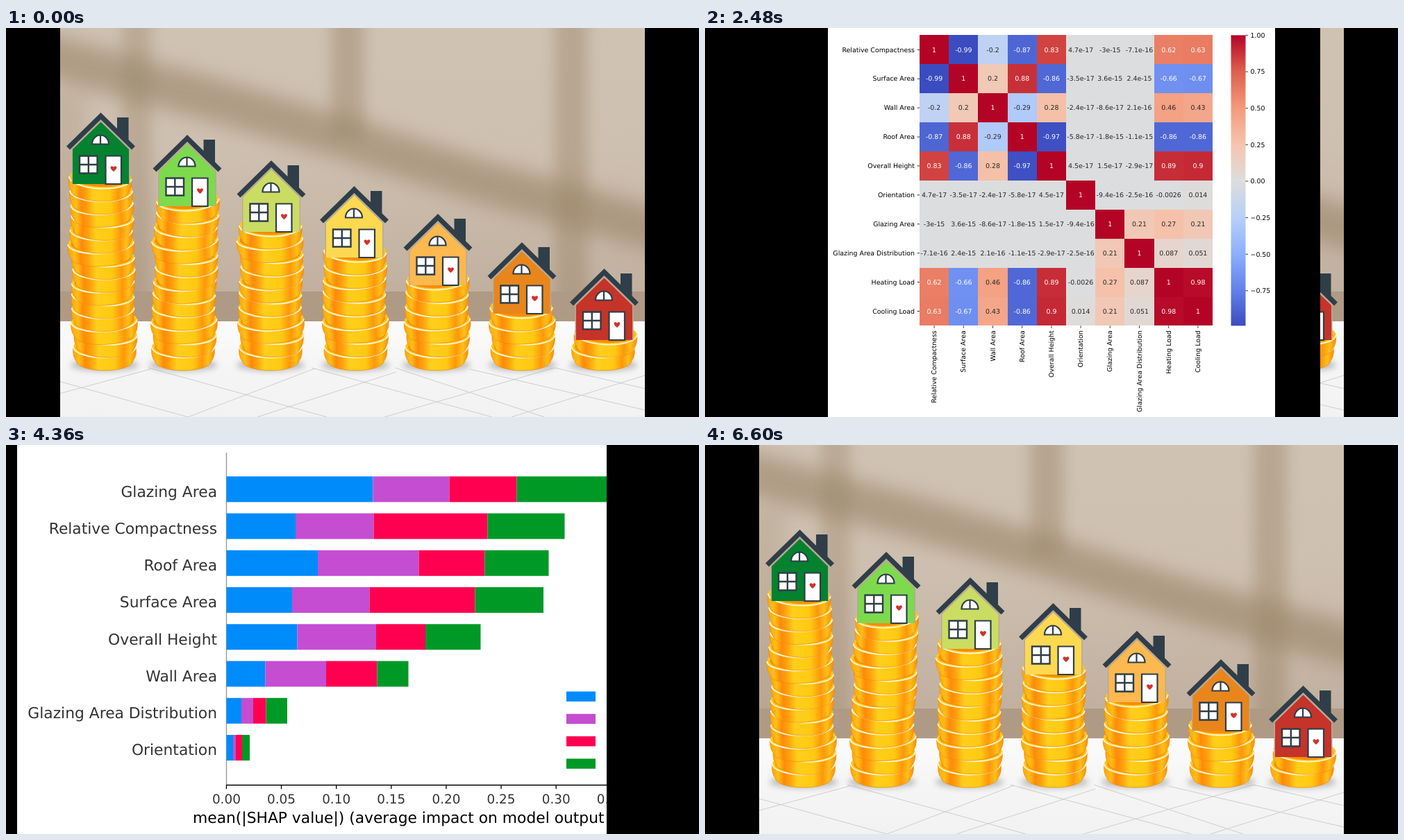
Recreate the animation shown at these times as an HTML page. Size 998 by 561 pixels, loop 7.16 s.

```html
<!DOCTYPE html>
<html lang="en">
<head>
<meta charset="utf-8">
<title>Energy efficiency slides</title>
<style>
  html, body { margin: 0; width: 100%; height: 100%; overflow: hidden; background: #000; }
  svg { display: block; }
  text { font-family: "DejaVu Sans", Verdana, sans-serif; text-rendering: geometricPrecision; }
</style>
</head>
<body>
<svg id="stage" width="998" height="561" viewBox="0 0 998 561"></svg>
<script>
const W = 998, H = 561;
const LOOP = 7160, FRAME = 40, WIPE = 2000;
const WIPE_STARTS = [920, 2840, 4760];

const rect = (x, y, w, h, fill, extra = '') =>
  `<rect x="${x}" y="${y}" width="${w}" height="${h}" fill="${fill}" ${extra}/>`;
const path = (d, fill = 'none', stroke = 'none', width = 1, extra = '') =>
  `<path d="${d}" fill="${fill}" stroke="${stroke}" stroke-width="${width}" ${extra}/>`;
const text = (x, y, size, str, anchor = 'start', fill = '#000', extra = '') =>
  `<text x="${x}" y="${y}" font-size="${size}" text-anchor="${anchor}" fill="${fill}" ${extra}>${str}</text>`;
const stops = list => list.map(([at, color]) => `<stop offset="${at}" stop-color="${color}"/>`).join('');

// Houses on coin stacks

const DARK = '#2f3e48';
const STACKS = [
  // house x, house bottom, base x, coins, wall colour
  [136.5, 225, 142, 14, '#04822f'],
  [261, 257, 255, 12, '#7dda4d'],
  [382, 294, 381, 10, '#cadd62'],
  [501.5, 331, 503.5, 8, '#fcd950'],
  [622, 371, 620, 6, '#fbb94f'],
  [743, 412, 743.5, 4, '#e8861b'],
  [861.5, 450, 860, 2, '#c53329'],
];

// The origin is the front of the upper rim
function coin(x, y, r, tilt) {
  const low = r - 4;
  return `<g transform="translate(${x} ${y}) rotate(${tilt})">`
    + path(`M${-r} -15c-1 8 0 15 4 20a${low} 14 0 0 0 ${2 * low} 0c4 -5 5 -12 4 -20z`, 'url(#gold)', '#f08a08', 0.7)
    + `<ellipse cy="-15" rx="${r}" ry="16" fill="#ffc51a"/>`
    + `<ellipse cy="-15" rx="${r - 4}" ry="13" fill="#f78c08"/>`
    + path(`M${-r} -15a${r} 15.500 0 0 0 ${2 * r} 0`, 'none', '#fff6d8', 1.8)
    + '</g>';
}

function stack([houseX, bottom, baseX, count]) {
  const pitch = (475 - bottom - 6) / (count - 1);
  let out = `<ellipse cx="${baseX}" cy="486" rx="49" ry="9" fill="#777" opacity=".45" filter="url(#soft4)"/>`;
  for (let k = 0; k < count; k++) {
    const lean = (houseX - baseX) * k / (count - 1);
    const wide = k % 6 === 2;
    const tilt = k ? 3 * Math.sin(k * 2.1) : 0;
    out += coin(baseX + lean + 1.5 * Math.sin(k * 1.3), 475 - pitch * k, wide ? 47.5 : 45, tilt);
  }
  return out;
}

function house([x, bottom, , , color]) {
  return `<g transform="translate(${x} ${bottom})">`
    + rect(23.5, -96, 16.5, 40, DARK)
    + path('M-42 0V-54L0 -95L42 -54V0z', '#b9a895')
    + path('M-40.5 0V-50L0 -89.5L40.5 -50V0z', color)
    + path('M-47 -52L0 -98L47 -52', 'none', DARK, 7)
    + path('M-12.5 -57.5a12 13 0 0 1 24 0zM-.5 -70V-57.5', '#fff', DARK, 2.2)
    + path('M-30.5 -40.5h25.5v25h-25.5zM-17.7 -40.5v25M-30.5 -28h25.5', '#fff', DARK, 2.4)
    + path('M7 0V-40.5H29.5V0z', '#fff', DARK, 2.2)
    + path('M18.5 -18C11 -23 14.5 -28 18.5 -24.5C22.5 -28 26 -23 18.5 -18z', '#d3312c')
    + '</g>';
}

function homeScene() {
  const shade = (d, width, opacity, blur) =>
    path(d, 'none', '#9c866a', width, `opacity="${opacity}" filter="url(#${blur})"`);
  return rect(0, 0, W, H, '#000')
    + '<svg x="78" width="842" height="561" viewBox="78 0 842 561">'
    + rect(78, 0, 842, 382, 'url(#wall)')
    + shade('M30 32L300 104L500 163L700 226L970 300', 62, 0.62, 'soft14')
    + shade('M188 -40V420', 42, 0.4, 'soft10')
    + shade('M40 90V420', 150, 0.24, 'soft14')
    + shade('M492 -40V160', 48, 0.48, 'soft10')
    + shade('M814 -40V420', 48, 0.46, 'soft10')
    + rect(78, 380, 842, 44, '#af9a86')
    + rect(78, 423, 842, 138, 'url(#floor)')
    + path('M78 527L208 492M78 510L262 561M205 490L462 561M262 561L445 491M362 561L562 496'
      + 'M440 490L700 561M560 490L775 561M545 561L790 490M668 492L920 551M728 561L920 501M790 490L920 520',
      'none', '#cdcdcd', 1)
    + STACKS.map(stack).join('') + STACKS.map(house).join('')
    + '</svg>';
}

// Correlation heatmap

const FEATURES = ['Relative Compactness', 'Surface Area', 'Wall Area', 'Roof Area', 'Overall Height',
  'Orientation', 'Glazing Area', 'Glazing Area Distribution', 'Heating Load', 'Cooling Load'];
// Upper triangle, one row per feature, starting at the diagonal
const CORRELATION = [
  '1 -0.99 -0.2 -0.87 0.83 4.7e-17 -3e-15 -7.1e-16 0.62 0.63',
  '1 0.2 0.88 -0.86 -3.5e-17 3.6e-15 2.4e-15 -0.66 -0.67',
  '1 -0.29 0.28 -2.4e-17 -8.6e-17 2.1e-16 0.46 0.43',
  '1 -0.97 -5.8e-17 -1.8e-15 -1.1e-15 -0.86 -0.86',
  '1 4.5e-17 1.5e-17 -2.9e-17 0.89 0.9',
  '1 -9.4e-16 -2.5e-16 -0.0026 0.014',
  '1 0.21 0.27 0.21',
  '1 0.087 0.051',
  '1 0.98',
  '1',
].map(row => row.split(' '));
const COOLWARM = [[59, 76, 192], [98, 130, 234], [141, 176, 254], [184, 208, 249], [221, 221, 221],
  [245, 196, 173], [244, 154, 123], [222, 96, 77], [180, 4, 38]];

function coolwarm(value) {
  const pos = (value + 0.99) / 1.99 * 8;
  const i = Math.min(7, Math.floor(pos));
  const mix = COOLWARM[i].map((c, n) => Math.round(c + (COOLWARM[i + 1][n] - c) * (pos - i)));
  return `rgb(${mix})`;
}

function heatScene() {
  const left = 309, top = 10.4, cw = 42.2, ch = 41.9, size = 9.41;
  let out = rect(0, 0, W, H, '#000') + rect(177, 0, 644, H, '#fff');
  let notes = '';
  FEATURES.forEach((name, r) => {
    const midY = top + (r + 0.5) * ch, midX = left + (r + 0.5) * cw;
    FEATURES.forEach((_, c) => {
      const label = CORRELATION[Math.min(r, c)][Math.abs(r - c)];
      const x = left + c * cw;
      out += rect(x, top + r * ch, cw, ch, coolwarm(+label), 'shape-rendering="crispEdges"');
      notes += text(x + cw / 2, midY + 3.2, size, label, 'middle', Math.abs(+label) > 0.55 ? '#fff' : '#262626');
    });
    notes += path(`M305.6 ${midY}H309M${midX} 429.4v3.4`, 'none', '#000', 0.8)
      + text(302, midY + 3.2, size, name, 'end')
      + text(0, 0, size, name, 'end', '#000', `transform="translate(${midX + 3} 436.3) rotate(-90)"`);
  });
  out += notes + rect(757.5, top, 21, 419, 'url(#scale)');
  for (let i = 0; i < 8; i++) {
    const y = top + i * 52.64, value = 1 - i / 4;
    out += path(`M778.5 ${y}h3.4`, 'none', '#000', 0.8)
      + text(785.5, y + 3.4, size, value.toFixed(2).replace('-', '\u2212'));
  }
  return out;
}

// Stacked importance bars

const CLASSES = [['Class 0', '#008bfb'], ['Class 3', '#c44dd2'], ['Class 2', '#ff0051'], ['Class 1', '#009926']];
const BARS = [
  ['Glazing Area', 528.5, 638.5, 735.5, 925.5],
  ['Relative Compactness', 417, 529.5, 693.5, 804.5],
  ['Roof Area', 449, 594.5, 689.5, 781.5],
  ['Surface Area', 412, 523.5, 675.5, 774],
  ['Overall Height', 419.5, 533, 604, 683.5],
  ['Wall Area', 373.5, 461, 534.5, 579.5],
  ['Glazing Area Distribution', 339, 356, 374.5, 405],
  ['Orientation', 327, 331, 340, 351],
];

function barScene() {
  let out = rect(0, 0, W, H, '#000') + rect(16, 0, 966, H, '#fff')
    + path('M317.5 11V490', 'none', '#999', 1.4);
  BARS.forEach(([name, ...ends], r) => {
    const y = 45.3 + r * 53.25;
    ends.forEach((end, i) => {
      const start = i ? ends[i - 1] : 317.5;
      out += rect(start, y, end - start, 37, CLASSES[i][1]);
    });
    out += text(304, y + 29.2, 21.8, name, 'end', '#333');
  });
  out += path('M317 490.5H957', 'none', '#000', 1.4);
  for (let i = 0; i <= 8; i++) {
    const x = 317.4 + i * 79.13;
    out += path(`M${x} 490v6`, 'none', '#000', 1.3)
      + text(x, 516.8, 18.4, (i * 0.05).toFixed(2), 'middle', '#333');
  }
  CLASSES.forEach(([name, color], i) => {
    const y = 355.5 + i * 32.3;
    out += rect(807, y, 42, 14.4, color) + text(864, y + 15.6, 20.1, name);
  });
  return out + text(269, 545, 21.8, 'mean(|SHAP value|) (average impact on model output magnitude)')
    + rect(982, 0, 16, H, '#000');
}

// Stage

const blur = n => `<filter id="soft${n}" filterUnits="userSpaceOnUse" x="-60" y="-80" width="1120" height="700">
  <feGaussianBlur stdDeviation="${n}"/></filter>`;
const vertical = 'x1="0" y1="0" x2="0" y2="1"';

document.getElementById('stage').innerHTML = `<defs>
  ${[4, 10, 14].map(blur).join('')}
  <linearGradient id="wall" ${vertical}>${stops([[0, '#cfc2b3'], [0.45, '#cec0b0'], [1, '#c1b09f']])}</linearGradient>
  <linearGradient id="floor" ${vertical}>${stops([[0, '#fbfbfb'], [0.5, '#f5f5f5'], [1, '#f2f2f2']])}</linearGradient>
  <linearGradient id="gold">${stops([[0, '#ffa60a'], [0.1, '#ffbe18'], [0.19, '#ff8a0a'], [0.28, '#ffa00c'],
    [0.4, '#ffcf1c'], [0.66, '#ffc912'], [0.8, '#ff970a'], [0.9, '#ffc01a'], [1, '#f98e06']])}</linearGradient>
  <linearGradient id="scale" ${vertical}>${stops(COOLWARM.map((c, i) => [1 - i / 8, `rgb(${c})`]).reverse())}</linearGradient>
  <g id="home">${homeScene()}</g>
</defs>
<use href="#home"/>
${[heatScene(), barScene(), '<use href="#home"/>'].map(s => `<svg class="wipe" width="0" height="${H}">${s}</svg>`).join('')}`;

const layers = document.querySelectorAll('.wipe');

// Sine ease in and out; the edge runs slightly past both sides
function wipeEdge(u) {
  if (u <= 0) return 0;
  if (u >= 1) return W;
  const edge = W / 2 - (W / 2 + 3.5) * Math.cos(Math.PI * u);
  return Math.round(Math.max(0, Math.min(W, edge)));
}

function render(ms) {
  const t = Math.floor((ms % LOOP) / FRAME) * FRAME;
  layers.forEach((layer, i) => layer.setAttribute('width', wipeEdge((t - WIPE_STARTS[i]) / WIPE)));
}

const begin = performance.now();
function tick() {
  render(performance.now() - begin);
  requestAnimationFrame(tick);
}
render(0);
requestAnimationFrame(tick);
</script>
</body>
</html>
```
